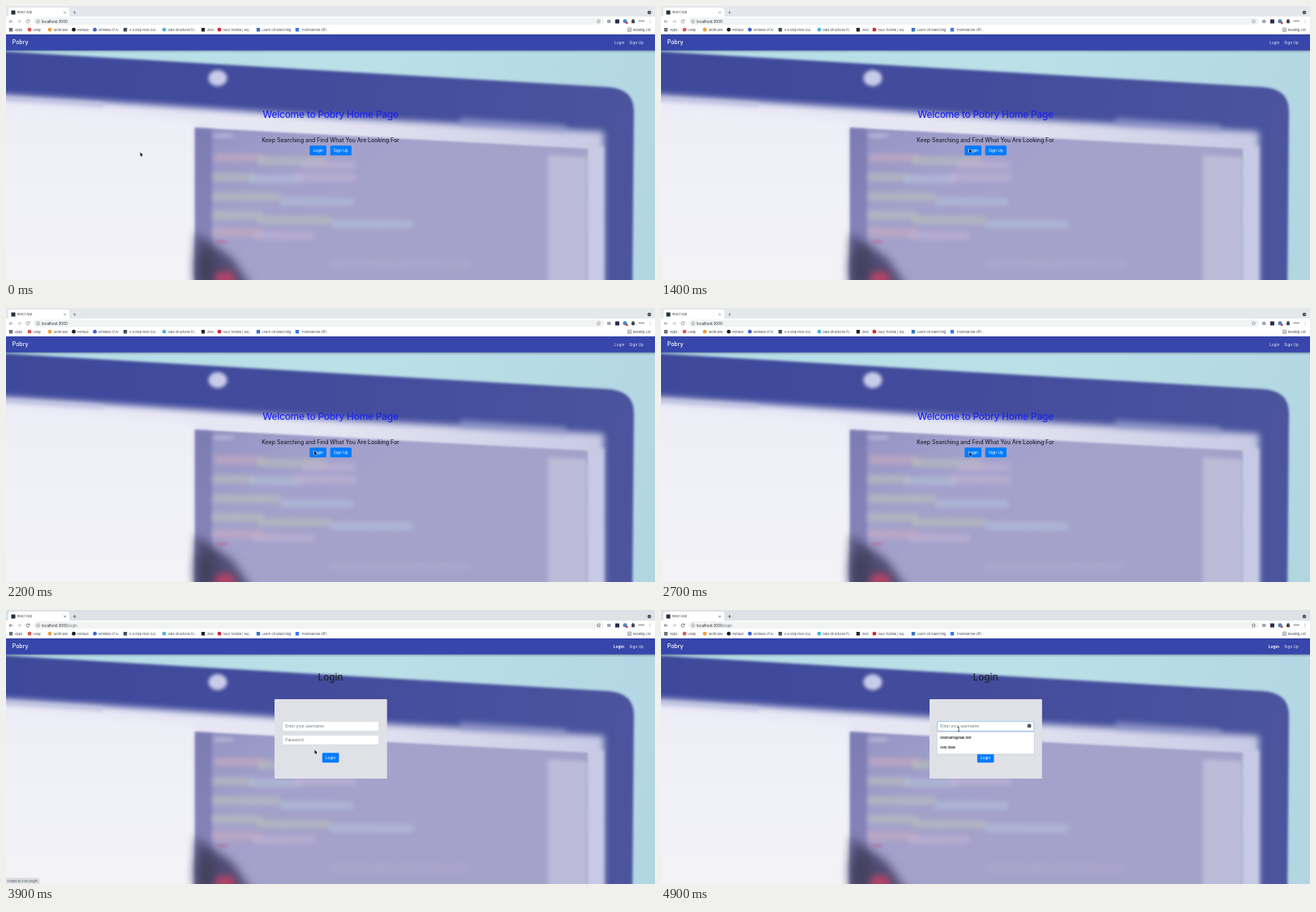
These frames come from a looping animation (800x338 px, 5000 ms). An HTML page with a canvas:

```html
<!DOCTYPE html>
<html lang="en">
<head>
<meta charset="utf-8">
<title>React App</title>
<style>
  html, body { margin: 0; width: 100%; height: 100%; overflow: hidden; background: #fff; }
  canvas { display: block; width: 800px; height: 338px; }
</style>
</head>
<body>
<canvas id="stage"></canvas>
<script>
const W = 800, H = 338, LOOP = 5000;
const FOCUS = 2750, STATUS = 3350, LOGIN_PAGE = 3550, FIELD = 4550;
const BRAND = 'Pobry';
const dpr = window.devicePixelRatio || 1;
const stage = document.getElementById('stage');

function prepare(canvas) {
  canvas.width = W * dpr;
  canvas.height = H * dpr;
  const c = canvas.getContext('2d');
  c.scale(dpr, dpr);
  return c;
}
const ctx = prepare(stage);

function box(x, y, w, h, fill, r = 0, stroke) {
  ctx.beginPath();
  ctx.roundRect(x, y, w, h, r);
  if (fill) { ctx.fillStyle = fill; ctx.fill(); }
  if (stroke) { ctx.strokeStyle = stroke; ctx.lineWidth = 0.5; ctx.stroke(); }
}
function dot(x, y, r, fill) {
  ctx.beginPath();
  ctx.arc(x, y, r, 0, Math.PI * 2);
  ctx.fillStyle = fill;
  ctx.fill();
}
function line(points, color, width = 0.7) {
  ctx.beginPath();
  points.forEach(([x, y]) => ctx.lineTo(x, y));
  ctx.strokeStyle = color;
  ctx.lineWidth = width;
  ctx.stroke();
}
function text(str, x, y, size, color, { weight = 400, align = 'left', spacing = 0 } = {}) {
  ctx.font = `${weight} ${size}px Inter, "Open Sans", sans-serif`;
  ctx.letterSpacing = spacing + 'px';
  ctx.textAlign = align;
  ctx.fillStyle = color;
  ctx.fillText(str, x, y);
}

// Soft blurred laptop photo, painted once
function paintPhoto() {
  const canvas = document.createElement('canvas');
  const c = prepare(canvas);
  const shape = (points, fill, blur) => {
    c.filter = `blur(${blur * dpr}px)`;
    c.beginPath();
    points.forEach(([x, y]) => c.lineTo(x, y));
    c.closePath();
    c.fillStyle = fill;
    c.fill();
  };
  const blob = (x, y, rx, ry, fill, blur) => {
    c.filter = `blur(${blur * dpr}px)`;
    c.beginPath();
    c.ellipse(x, y, rx, ry, 0, 0, Math.PI * 2);
    c.fillStyle = fill;
    c.fill();
  };
  const ramp = (x0, y0, x1, y1, ...colors) => {
    const g = c.createLinearGradient(x0, y0, x1, y1);
    colors.forEach((col, i) => g.addColorStop(i / (colors.length - 1), col));
    return g;
  };

  c.fillStyle = ramp(0, 55, 800, 338, '#b5dce6', '#bbe0e8', '#b2d5e2');
  c.fillRect(0, 0, W, H);

  // Lid
  c.filter = `blur(${1.5 * dpr}px)`;
  c.beginPath();
  c.moveTo(-20, 55);
  c.lineTo(400, 80);
  c.lineTo(742, 100);
  c.quadraticCurveTo(774, 102, 774, 130);
  c.lineTo(772, 360);
  c.lineTo(-20, 360);
  c.fillStyle = ramp(0, 60, 780, 200, '#3e499b', '#434c9c', '#4b549d');
  c.fill();

  // Screen
  shape([[-20, 109], [120, 118], [400, 137], [737, 155], [737, 360], [-20, 360]],
    ramp(0, 110, 740, 300, '#e9eaf6', '#e6e6f3', '#c3c7e2'), 4);
  shape([[-20, 122], [232, 142], [232, 360], [-20, 360]],
    ramp(0, 120, 0, 338, '#ededf7', '#f1f1f8', '#f2f2f7'), 4);
  shape([[-10, 111], [120, 119], [120, 125], [-10, 117]], 'rgba(190,193,226,.7)', 2);
  shape([[560, 137], [690, 146], [690, 157], [560, 148]], 'rgba(160,165,212,.5)', 3);

  // Editor
  shape([[233, 150], [718, 176], [718, 360], [233, 360]],
    ramp(233, 150, 360, 338, '#9292c3', '#a3a1cc', '#a5a2ca'), 1.2);
  shape([[233, 151], [254, 152], [254, 360], [233, 360]], 'rgba(102,102,165,.5)', 2);
  shape([[668, 184], [717, 187], [717, 360], [668, 360]], 'rgba(197,196,221,.75)', 2.5);
  shape([[718, 172], [737, 173], [737, 360], [718, 360]], '#c6cae4', 2);
  blob(268, 160, 14, 3, 'rgba(205,206,231,.5)', 2);
  blob(261, 89, 11.5, 10, '#c8cce9', 2);

  // Code rows: x, y, length, tint
  const tints = ['198,170,192', '184,190,186', '178,190,218', '192,178,211'];
  [[257, 187, 62, 0], [310, 191, 85, 1], [365, 196, 65, 3],
   [255, 211, 52, 1], [300, 213, 65, 2], [355, 211, 77, 3],
   [255, 235, 84, 1], [338, 241, 90, 2],
   [255, 258, 62, 1], [310, 264, 92, 1], [400, 269, 102, 2],
   [255, 279, 62, 0], [305, 283, 75, 3],
   [400, 318, 170, 3]].forEach(([x, y, len, tint], i) =>
    shape([[x, y - 5], [x + len, y - 4], [x + len, y + 5], [x, y + 5]],
      `rgba(${tints[tint]},${i === 13 ? 0.25 : 0.72})`, 3));

  // Dark corner
  shape([[234, 280], [251, 292], [279, 311], [305, 350], [234, 350]], '#514d74', 6);
  blob(247, 324, 12, 25, '#44415f', 7);
  blob(270, 336, 13, 9, '#b34266', 4);
  blob(266, 291, 8, 2, 'rgba(185,105,150,.6)', 1.5);
  return canvas;
}
const photo = paintPhoto();

const bookmarks = [
  ['Apps', 11, 6, '#6b7078', 1], ['Ulvay', 33, 29, '#d85a54', 0],
  ['MottCave', 59, 54, '#eaa23c', 0], ['FenNub', 88, 83.5, '#1d2024', 0],
  ['Wrinkles of AI', 114, 109.5, '#3f63d2', 0], ['A 6 Step Field Gui...', 152, 147, '#43505c', 1],
  ['Data Structures fo...', 199.5, 195, '#4fb4e0', 0], ['Zelb', 248, 243, '#26282b', 1],
  ['NQZ Tutorial | NQ...', 268, 263, '#cf2e35', 0], ['Learn Git Branching', 316, 311, '#3c78bc', 1],
  ['Thornbarrow Offi...', 364, 359, '#3d7bea', 1]
];

function star(x, y, r, color) {
  const points = [];
  for (let i = 0; i <= 10; i++) {
    const a = -Math.PI / 2 + i * Math.PI / 5, d = i % 2 ? r * 0.45 : r;
    points.push([x + d * Math.cos(a), y + d * Math.sin(a)]);
  }
  line(points, color, 0.5);
}

function drawBrowser(t) {
  const active = t >= FOCUS;
  const ink = active ? '#45494e' : '#777b80';
  const label = '#3c4043';
  box(0, 0, W, 14, active ? '#dee1e6' : '#e4e7eb');
  box(3, 2, 75, 13, '#fff', [3, 3, 0, 0]);
  box(6.5, 5.5, 5, 5, '#23303c', 0.5);
  text('React App', 14, 9.3, 3.7, label);
  line([[71.2, 6.7], [73.8, 9.3]], ink, 0.6);
  line([[73.8, 6.7], [71.2, 9.3]], ink, 0.6);
  line([[82.6, 8], [86.4, 8]], ink, 0.7);
  line([[84.5, 6.1], [84.5, 9.9]], ink, 0.7);
  dot(793, 8, 2.3, '#474b50');
  line([[792, 7.5], [793, 8.5], [794, 7.5]], '#fff', 0.5);

  box(0, 13, W, 22, '#fff');
  line([[8.5, 19], [4.2, 19]], ink);
  line([[6.2, 17], [4.2, 19], [6.2, 21]], ink);
  line([[14, 19], [18.3, 19]], '#a9adb2');
  line([[16.3, 17], [18.3, 19], [16.3, 21]], '#a9adb2');
  ctx.beginPath();
  ctx.arc(27, 19, 2, 0.4, Math.PI * 1.8);
  ctx.strokeStyle = ink;
  ctx.lineWidth = 0.7;
  ctx.stroke();
  line([[29, 16.6], [29, 18.5], [27.2, 18.5]], ink, 0.6);

  box(34, 14.3, 703, 9, '#f1f3f4', 4.5);
  ctx.beginPath();
  ctx.arc(39.5, 19, 2, 0, Math.PI * 2);
  ctx.strokeStyle = '#62666b';
  ctx.lineWidth = 0.5;
  ctx.stroke();
  line([[39.5, 18.7], [39.5, 20.2]], '#62666b', 0.5);
  text('localhost:3000', 44, 20.5, 4.5, '#25282c');
  if (t >= LOGIN_PAGE) {
    const end = 44 + ctx.measureText('localhost:3000').width;
    text('/login', end, 20.5, 4.5, '#6a6e73');
  }
  star(730.5, 19, 2.5, ink);
  box(741, 17, 4.5, 4, '#a0a5af', 1);
  box(751, 16.5, 5, 5, '#292c52', 0.5);
  dot(763, 18.8, 2.5, '#4888c8');
  dot(765.3, 20.7, 1.5, '#d8464c');
  box(771, 17.2, 4, 4, '#44484d', 0.8);
  dot(773, 17.1, 1, '#44484d');
  line([[779.5, 18.5], [787, 18.5]], '#72767b', 0.9);
  [17.2, 19, 20.8].forEach(y => dot(794, y, 0.45, ink));

  bookmarks.forEach(([name, x, icon, color, square]) => {
    if (square) box(icon - 2.2, 27, 4.4, 4.4, color, 0.4);
    else dot(icon, 29.2, 2.4, color);
    text(name, x, 30.6, 3.75, label);
  });
  box(766.4, 27, 4.2, 4.4, null, 0.4, '#55595e');
  [28.2, 29.3, 30.4].forEach(y => line([[767.2, y], [769.8, y]], '#55595e', 0.4));
  text('Reading List', 773, 30.6, 3.75, label);
}

function drawNav(t) {
  const shade = ctx.createLinearGradient(0, 54, 0, 58);
  shade.addColorStop(0, 'rgba(20,30,80,.4)');
  shade.addColorStop(1, 'rgba(20,30,80,0)');
  box(0, 54, W, 4, shade);
  box(0, 35, W, 19.7, '#3646aa');
  text(BRAND, 7.7, 47.2, 7, '#fff', { weight: 500 });
  const here = t >= LOGIN_PAGE;
  text('Login', here ? 749 : 750, 46.6, 4.75, here ? '#fff' : '#e6e8f6', { weight: here ? 700 : 400 });
  text('Sign Up', 768.3, 46.6, 4.75, '#e6e8f6');
}

function button(label, x, y, w, fill) {
  box(x, y, w, 12, fill, 1.3);
  text(label, x + w / 2, y + 7.8, 4.8, '#fff', { align: 'center' });
}

function drawHome(t) {
  text(`Welcome to ${BRAND} Home Page`, 400, 138, 11.9, '#1b24ec',
    { weight: 500, align: 'center', spacing: -0.2 });
  text('Keep Searching and Find What You Are Looking For', 400, 168, 6.9, '#23252f',
    { weight: 500, align: 'center' });
  button('Login', 374.3, 172.2, 20.7, t >= FOCUS ? '#0062cc' : '#007bff');
  button('Sign Up', 399.7, 172.2, 26.2, '#007bff');
}

function drawLogin(t) {
  const open = t >= FIELD;
  text('Login', 400, 87.2, 11.7, '#212529', { weight: 500, align: 'center' });
  box(331, 110, 138.7, 98, '#dfe1e7', 1.3);
  if (open) box(340.2, 136.9, 120, 13, '#b4d2ee', 1.8);
  box(341, 137.6, 118.6, 11.7, '#fff', 1.3, open ? '#70b1f2' : '#ced4da');
  text('Enter your username', 344.3, 145.1, 4.85, '#6c757d');
  box(341, 154.4, 118.6, 11.7, '#fff', 1.3, '#ced4da');
  text('Password', 344.3, 162, 4.85, '#6c757d');
  button('Login', 389.8, 176.3, 20.6, '#007bff');
  if (!open) return;
  box(451.7, 140.8, 4.5, 4.2, '#43474c', 0.6);
  line([[452.3, 142.9], [455.6, 142.9]], '#c9ccd0', 0.4);
  box(340.2, 150.4, 120, 27.4, '#fff', 0.8, '#b9bdc4');
  text('dvelmarin@mail.test', 344.3, 159.3, 3.85, '#202124', { weight: 600 });
  text('ovin.trask', 344.3, 170.5, 3.85, '#202124', { weight: 600 });
}

function drawStatus() {
  box(-1, 331, 41.5, 8, '#dee1e6', [0, 1.5, 0, 0], '#b9bec6');
  text('localhost:3000/login', 1.5, 336.2, 3.85, '#4a4e53');
}

// Pointer path: time, x, y
const path = [
  [0, 165.5, 180.5], [100, 165.5, 180.5], [700, 340, 207.3], [1250, 380, 176.3],
  [2500, 380, 176.3], [2900, 380.6, 179.4], [3550, 380.6, 179.4],
  [3850, 380.5, 172.6], [4050, 380.5, 172.6], [4450, 367, 147], [5000, 367, 147]
];
function pointerAt(t) {
  const i = path.findIndex(p => p[0] > t);
  const [t0, x0, y0] = path[i - 1], [t1, x1, y1] = path[i];
  const u = (t - t0) / (t1 - t0), e = u * u * (3 - 2 * u);
  return [x0 + (x1 - x0) * e, y0 + (y1 - y0) * e];
}

function drawPointer(t) {
  const [x, y] = pointerAt(t);
  ctx.save();
  ctx.translate(x, y);
  if (t >= 4400) {
    line([[0, -2.7], [0, 2.7]], '#222', 0.7);
    [-2.7, 2.7].forEach(d => line([[-1, d], [1, d]], '#222', 0.5));
  } else if (t >= FOCUS && t < LOGIN_PAGE) {
    box(-0.6, 0, 1.3, 4, '#fff', 0.6, '#111');
    box(-1.6, 2.6, 4, 3.4, '#fff', 1, '#111');
    box(-0.4, 1, 0.9, 3, '#fff', 0.4);
  } else {
    ctx.beginPath();
    [[0, 0], [0, 4.6], [1, 3.7], [1.8, 5.4], [2.6, 5], [1.9, 3.4], [3.2, 3.3]]
      .forEach(([px, py]) => ctx.lineTo(px, py));
    ctx.closePath();
    ctx.strokeStyle = '#fff';
    ctx.lineWidth = 0.7;
    ctx.stroke();
    ctx.fillStyle = '#000';
    ctx.fill();
  }
  ctx.restore();
}

function draw(t) {
  ctx.drawImage(photo, 0, 0, W, H);
  drawNav(t);
  drawBrowser(t);
  if (t < LOGIN_PAGE) drawHome(t);
  else drawLogin(t);
  if (t >= STATUS && t < 4400) drawStatus();
  drawPointer(t);
}

const start = performance.now();
function tick() {
  draw((performance.now() - start) % LOOP);
  requestAnimationFrame(tick);
}
tick();
</script>
</body>
</html>
```
